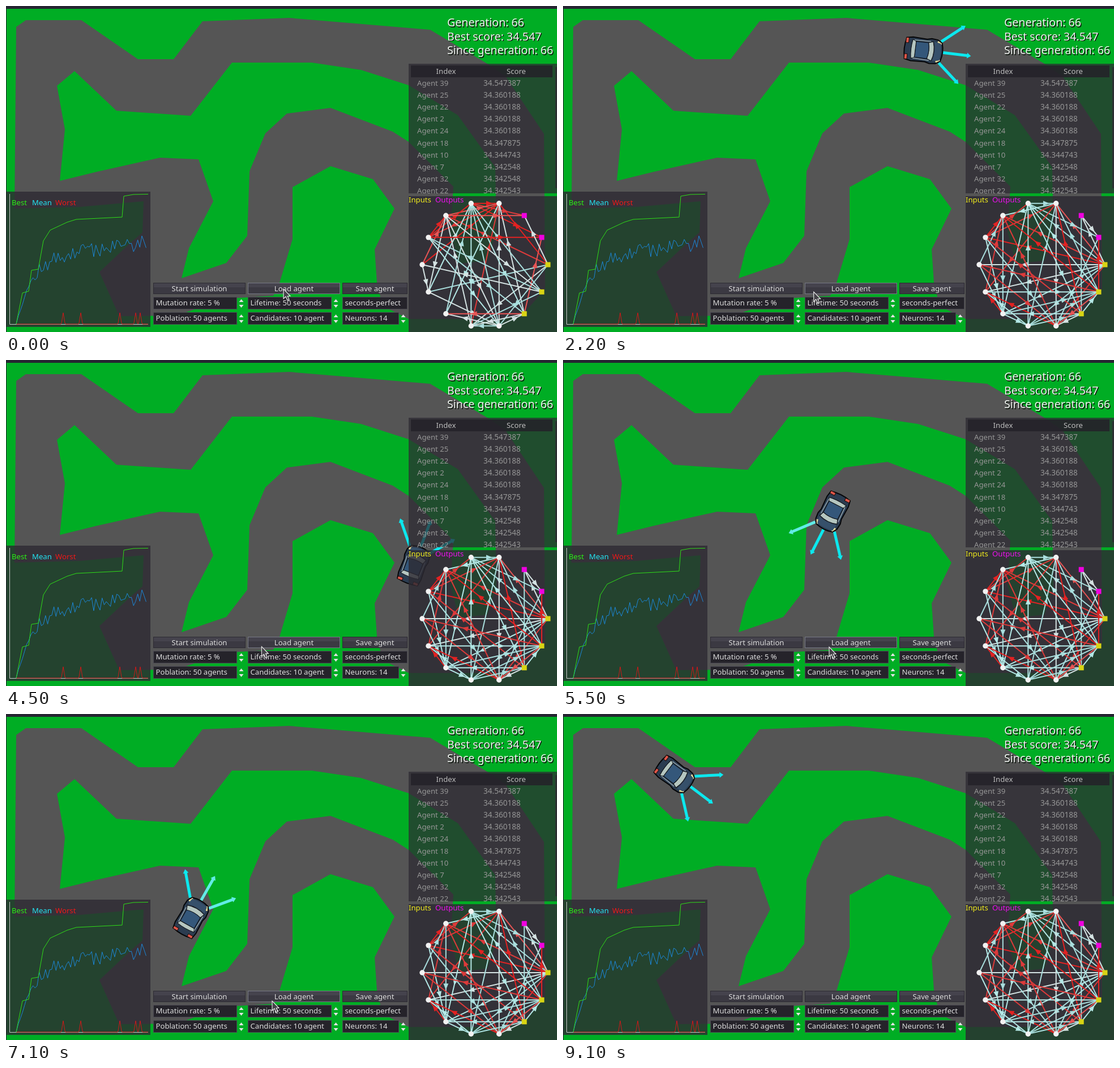
These frames come from a looping animation (973 px wide and 576 px high, 9200 ms). An HTML page:

```html
<!DOCTYPE html>
<html lang="en">
<head>
<meta charset="utf-8">
<title>Driving agents</title>
<style>
html, body { margin: 0; width: 973px; height: 576px; overflow: hidden; background: #00ad24; }
svg { display: block; }
text { font: 13.15px "Noto Sans", "Open Sans", sans-serif; white-space: pre; }
.big { font-size: 19.6px; }
.score { font-size: 13.6px; }
</style>
</head>
<body>
<svg id="stage" width="973" height="576" viewBox="0 0 973 576"></svg>
<script>
const LOOP = 9200, STEP = 100, APPEAR = 300, RESPAWN = 8300, RESPAWN_SHIFT = 8050, POINTER_GONE = 7700;
const stage = document.getElementById('stage');

function add(tag, attrs = {}, parent = stage) {
  const el = document.createElementNS('http://www.w3.org/2000/svg', tag);
  for (const key in attrs) el.setAttribute(key, attrs[key]);
  parent.append(el);
  return el;
}
const rect = (x, y, width, height, fill, extra, parent) =>
  add('rect', { x, y, width, height, fill, ...extra }, parent);
const path = (d, attrs, parent) => add('path', { d, ...attrs }, parent);
function label(x, y, content, fill, extra, parent) {
  const el = add('text', { x, y, fill, ...extra }, parent);
  el.textContent = content;
  return el;
}
function seeded(seed) {
  return () => {
    seed = (seed * 1664525 + 1013904223) % 4294967296;
    return seed / 4294967296;
  };
}

// ---- track
const outer = 'M18 37L35 25 133 25 233 94 296 94 347 27 500 21 749 42 850 102 882 124 950 226 ' +
  '952 500 910 548 880 553 711 553 665 530 655 489 651 430 686 358 648 306 573 283 506 320 506 412 ' +
  '483 489 472 512 390 517 300 547 200 548 165 470 218 420 241 400 243 345 130 355 15 358Z';
const island = 'M121 115L195 185 326 194 399 100 540 100 627 113 711 140 798 193 864 285 866 400 850 450 ' +
  '800 455 785 400 790 319 711 240 683 222 573 180 496 190 458 225 430 292 426 406 389 454 310 481 ' +
  '323 428 366 345 340 271 272 268 160 293 95 309 104 218 90 141Z';
rect(0, 0, 973, 576, '#00ad24');
const road = path(outer + island, { fill: '#555', 'fill-rule': 'evenodd' });
rect(0, 0, 1, 576, '#252531');

// ---- car, drawn facing up around its centre
const car = add('g');
const rays = [-1, 0, 1].map(side => {
  const ray = { x: side * 19, y: Math.abs(side) * 4 - 34, turn: side * 40 };
  ray.el = path('M-2.5 0V-44H-5L0 -51 5 -44H2.5V0Z',
    { transform: `translate(${ray.x} ${ray.y}) rotate(${ray.turn})` }, car);
  return ray;
});
path('M-16 -32Q0 -37 16 -32L21 -24 22 -13 20 -5 21 20 19 31Q0 36 -19 31L-21 20 -20 -5 -22 -13 -21 -24Z',
  { fill: '#2b3c50', stroke: '#050608', 'stroke-width': 2 }, car);
path('M-18 -24L-14 -31M18 -24L14 -31', { stroke: '#e8dc9a', 'stroke-width': 3 }, car);
path('M-15 -30Q0 -33 15 -30L17 -18Q0 -23 -17 -18Z', { fill: '#36506a' }, car);
path('M-17 -16Q0 -22 17 -16L14 -8Q0 -12 -14 -8Z', { fill: '#b5c6c0', stroke: '#0b0d10' }, car);
path('M-14 -8Q0 -12 14 -8V14H-14Z', { fill: '#34577a', stroke: '#0b0d10' }, car);
path('M-14 14H14L17 20Q0 23 -17 20Z', { fill: '#b5c6c0', stroke: '#0b0d10' }, car);
path('M-17 -12L-16 17M17 -12L16 17', { stroke: '#8fa0a6', 'stroke-width': 1.5 }, car);
for (const x of [-19, 10]) rect(x, 27, 9, 5, '#e0574a', { stroke: '#1a0a08' }, car);

// ---- panels
rect(0, 0, 973, 5, '#252531');
const panel = (x, y, w, h, alpha) => rect(x, y, w, h, `rgba(45,42,50,${alpha})`);

panel(711, 102, 262, 229, .73);
panel(970, 108, 3, 214, .8);
rect(715, 105, 250, 21, '#242129', { opacity: .85 });
label(777, 120, 'Index', '#bcbcbc', { 'text-anchor': 'middle' });
label(901, 120, 'Score', '#bcbcbc', { 'text-anchor': 'middle' });
const clip = add('clipPath', { id: 'table' });
rect(711, 102, 258, 229, '#000', {}, clip);
const table = add('g', { 'clip-path': 'url(#table)' });
const ranking = ['39 34.547387', '25 34.360188', '22 34.360188', '2 34.360188', '24 34.360188',
  '18 34.347875', '10 34.344743', '7 34.342548', '32 34.342548', '22 34.342543'];
ranking.forEach((row, i) => {
  const y = 141 + i * 21.1, [agent, score] = row.split(' ');
  label(726, y, 'Agent ' + agent, '#969696', {}, table);
  label(843, y, score, '#969696', { class: 'score' }, table);
});

['Generation: 66', 'Best score: 34.547', 'Since generation: 66'].forEach((content, i) => {
  const y = 36 + i * 24.5;
  label(780.5, y + 1.5, content, '#101810', { class: 'big' });
  label(779, y, content, '#eef2ee', { class: 'big' });
});

// ---- score chart
panel(1, 328, 254, 239, .8);
const line = (points, stroke) => add('polyline', { points, fill: 'none', stroke, 'stroke-width': 1 });
function plot(step, height, stroke) {
  const points = [];
  for (let x = 18; x <= 251; x += step) points.push([x, 562 - height(x)]);
  line(points.join(' '), stroke);
}
const noise = seeded(12);
const spikes = [101, 132, 201, 229, 237];
line('6.5,332 6.5,562.5 251,562.5', '#c8c8c8');
plot(1, x => Math.max(0, ...spikes.map(s => 20 - 6 * Math.abs(x - s))), '#d01818');
plot(3.7, x => 115 * (1 - Math.exp((18 - x) / 28)) + .13 * (x - 18) +
  (noise() - .5) * Math.min(28, x - 18), '#1c86d6');
line('18,562 29,507 40,504 45,467 57,465 66,415 78,396 108,382 124,377 205,373 208,336 225,333 251,332.5',
  '#2fdc18');
label(10, 352, 'Best', '#2cf016');
label(46, 352, 'Mean', '#22e4f2');
label(87, 352, 'Worst', '#f01818');

// ---- neural network: 14 neurons on a ring, numbered anticlockwise from the right
panel(711, 336, 262, 240, .82);
const isOutput = k => k === 1 || k === 2;
const isInput = k => k === 0 || k > 11;
const node = k => {
  const a = k * Math.PI / 7;
  return [846 + 111 * Math.cos(a), 457 - 111 * Math.sin(a)];
};
function link(from, to, color, parent) {
  const [x1, y1] = node(from), [x2, y2] = node(to);
  const angle = Math.atan2(y2 - y1, x2 - x1) * 180 / Math.PI;
  path(`M${x1} ${y1}L${x2} ${y2}`, { stroke: color, 'stroke-width': 2 }, parent);
  path('M6 0L-5 -4.5V4.5Z', {
    fill: color,
    transform: `translate(${x1 + (x2 - x1) * .64} ${y1 + (y2 - y1) * .64}) rotate(${angle})`
  }, parent);
}
function network(seed, density, redChance) {
  const g = add('g'), random = seeded(seed);
  for (let a = 0; a < 14; a++) {
    for (let b = a + 1; b < 14; b++) {
      const chance = isOutput(a) || isOutput(b) ? .15 : isInput(a) && isInput(b) ? .3 : density;
      const present = random() < chance, forward = isInput(a) || random() < .4;
      const shade = Math.floor(random() * 3), red = random() < redChance(a, b);
      const color = (red ? ['#e32222', '#dd3a3a', '#e85555'] : ['#b4e8e6', '#d4e2e2', '#a9dedd'])[shade];
      if (present) link(forward ? a : b, forward ? b : a, color, g);
    }
  }
  return g;
}
const firstNet = network(5, .55, (a, b) => a > 0 && b < 7 ? .95 : .15);
const secondNet = network(9, .72, (a, b) => [a, b].some(k => k > 4 && k < 9) ? .6 : .14);
link(5, 2, '#e85555', firstNet);
link(6, 1, '#e32222', firstNet);
link(0, 2, '#d4e2e2', firstNet);
link(2, 1, '#d4e2e2', secondNet);
for (let k = 0; k < 14; k++) {
  const [x, y] = node(k);
  if (isInput(k) || isOutput(k)) rect(x - 4.5, y - 4.5, 9, 9, isInput(k) ? '#d8d414' : '#f000e0');
  else add('circle', { cx: x, cy: y, r: 4.7, fill: '#f2f2f2' });
}
label(711, 347, 'Inputs', '#f4f01c');
label(758, 347, 'Outputs', '#f010f0');

// ---- controls
function button(x, width, content) {
  const el = rect(x + .5, 489.5, width - 1, 19, '#3b3942', { stroke: '#2c2a32' });
  rect(x + 1, 490, width - 2, 7, '#45434d');
  label(x + width / 2, 504, content, '#dedede', { 'text-anchor': 'middle' });
  return el;
}
const startButton = button(260, 163, 'Start simulation');
const loadButton = button(427, 163, 'Load agent');
button(594, 115, 'Save agent');

function field(x, y, width, content, spinner = true) {
  rect(x + .5, y + .5, width - 1, 21, '#25232a', { stroke: '#4a4852' });
  label(x + 4.5, y + 15, content, '#dedede');
  if (!spinner) return;
  const cx = x + width + 7.5, cy = y + 11;
  path(`M${cx - 4} ${cy - 2}h8l-4 -5ZM${cx - 4} ${cy + 3}h8l-4 5Z`, { fill: '#e4e4e4' });
}
field(260, 514, 148, 'Mutation rate: 5 %');
field(427, 514, 148, 'Lifetime: 50 seconds');
field(594, 514, 115, 'seconds-perfect', false);
field(260, 541, 148, 'Poblation: 50 agents');
field(427, 541, 148, 'Candidates: 10 agent');
field(594, 541, 100, 'Neurons: 14');

const pointer = path('M0 0V17L4 13.5 7 20 10 18.7 7.2 12.5H12Z',
  { fill: '#444248', stroke: '#f0f0f0', 'stroke-width': 1.1 });

// ---- motion: waypoints of time, x, y; the car faces along the curve through them
const LAP = [
  [300, 57, 300], [700, 57, 135], [900, 113, 62], [1050, 197, 107], [1200, 260, 165],
  [1400, 319, 151], [1600, 372, 86], [1800, 445, 66], [2200, 636, 78], [2600, 816, 112],
  [2800, 908, 163], [3000, 922, 247], [3200, 920, 345], [3600, 890, 470], [4000, 775, 510],
  [4250, 692, 460], [4500, 720, 363], [4700, 744, 300], [5000, 640, 232], [5200, 560, 222],
  [5500, 476, 268], [5850, 462, 410], [6200, 368, 506], [6500, 260, 500], [6800, 262, 450],
  [7100, 327, 360], [7300, 345, 297], [7600, 196, 308], [7850, 80, 300], [8200, 58, 105]
];

// Hermite curve whose slopes come from the neighbouring waypoints
function alongLap(time) {
  const last = LAP.length - 1;
  const t = Math.max(LAP[0][0], Math.min(LAP[last][0] - 1, time));
  const i = LAP.findIndex(k => k[0] > t) - 1;
  const span = LAP[i + 1][0] - LAP[i][0], u = (t - LAP[i][0]) / span;
  const slope = (j, c) => {
    const a = LAP[Math.max(0, j - 1)], b = LAP[Math.min(last, j + 1)];
    return (b[c] - a[c]) / (b[0] - a[0]) * span;
  };
  const u2 = u * u, u3 = u2 * u;
  return [1, 2].map(c =>
    (2 * u3 - 3 * u2 + 1) * LAP[i][c] + (u3 - 2 * u2 + u) * slope(i, c) +
    (3 * u2 - 2 * u3) * LAP[i + 1][c] + (u3 - u2) * slope(i + 1, c));
}

const show = (el, on) => el.setAttribute('visibility', on ? 'visible' : 'hidden');

function onRoad(x, y) {
  const point = stage.createSVGPoint();
  point.x = x;
  point.y = y;
  return road.isPointInFill(point);
}

function placeCar(t) {
  const lapTime = t >= RESPAWN ? Math.max(APPEAR, t - RESPAWN_SHIFT) : t;
  const [x, y] = alongLap(lapTime);
  const [x0, y0] = alongLap(lapTime - 20), [x1, y1] = alongLap(lapTime + 20);
  const heading = Math.atan2(x1 - x0, y0 - y1);
  car.setAttribute('transform', `translate(${x} ${y}) rotate(${heading * 180 / Math.PI})`);
  const sin = Math.sin(heading), cos = Math.cos(heading);
  for (const ray of rays) {
    const a = heading + ray.turn * Math.PI / 180;
    const clear = onRoad(
      x + ray.x * cos - ray.y * sin + 23 * Math.sin(a),
      y + ray.x * sin + ray.y * cos - 23 * Math.cos(a));
    ray.el.setAttribute('fill', clear ? '#0ce8ee' : '#62ece6');
  }
}

function glide(t, start, end) {
  const u = Math.max(0, Math.min(1, (t - start) / (end - start)));
  return u * u * (3 - 2 * u);
}

function render(ms) {
  const t = Math.floor(ms % LOOP / STEP) * STEP;
  const loaded = t >= APPEAR;
  show(car, loaded);
  show(firstNet, !loaded);
  show(secondNet, loaded);
  if (loaded) placeCar(t);

  const px = 490 - 73 * glide(t, 1600, 2600) + 53 * glide(t, 4200, 4700);
  const py = 500 + 5 * glide(t, 1600, 2200) + 2 * glide(t, 4200, 4700);
  const active = t < POINTER_GONE;
  show(pointer, active);
  pointer.setAttribute('transform', `translate(${px} ${py})`);
  startButton.setAttribute('stroke', active && px < 423 ? '#777986' : '#2c2a32');
  loadButton.setAttribute('stroke', active && px >= 427 ? '#777986' : '#2c2a32');
}

const begin = performance.now();
function tick() {
  render(performance.now() - begin);
  requestAnimationFrame(tick);
}
tick();
</script>
</body>
</html>
```
